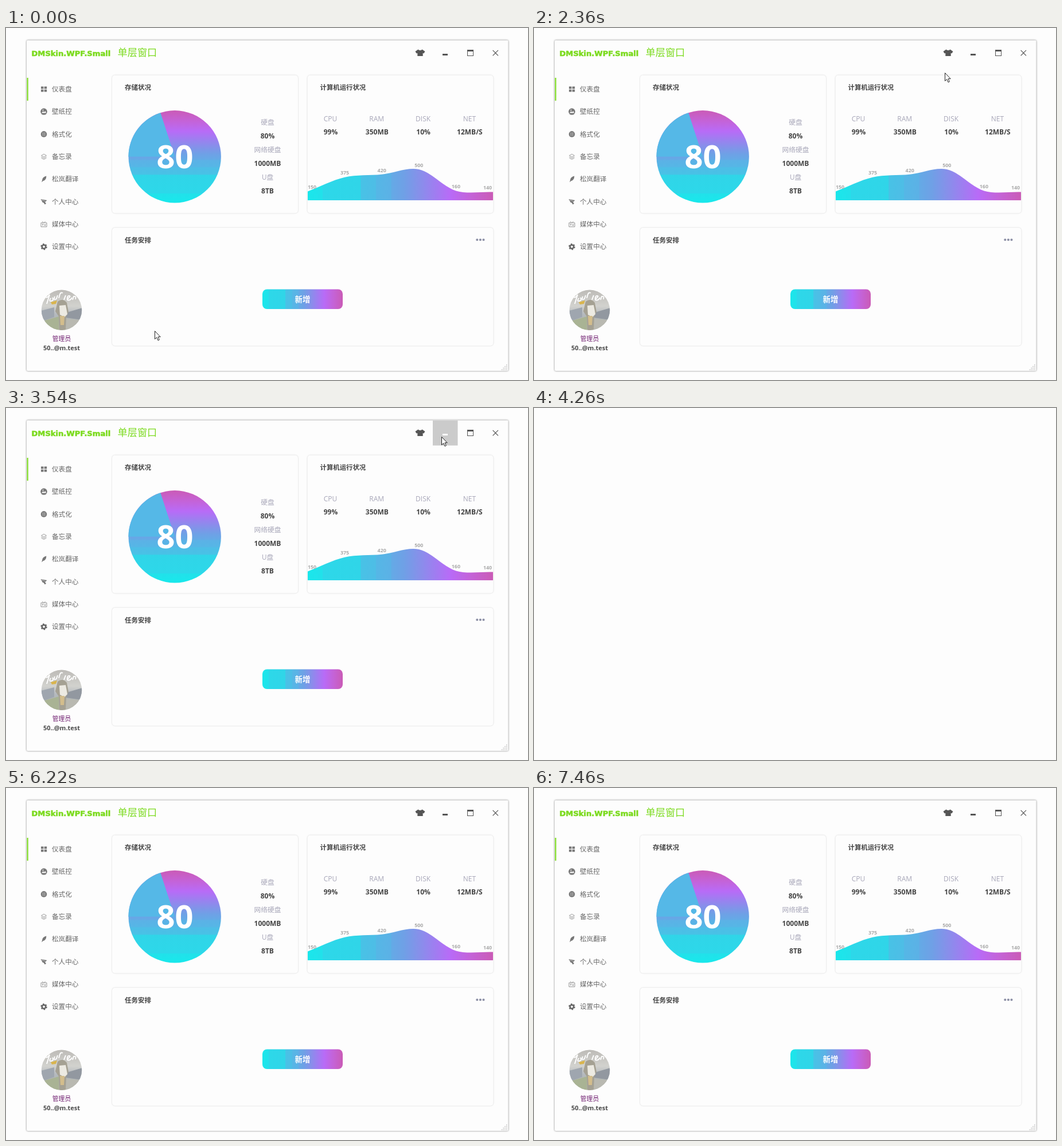
Write an HTML page that moves like this. It is 910x615 px and loops after 8 s.

```html
<!DOCTYPE html>
<html lang="zh-CN">
<head>
<meta charset="utf-8">
<title>Dashboard</title>
<style>
html, body { margin: 0; width: 100%; height: 100%; overflow: hidden; background: #fdfdfd; }
svg { display: block; width: 910px; height: 615px; }
text { font-family: "Open Sans", "Noto Sans CJK SC", "Noto Sans CJK", sans-serif; }
.b { font-weight: 700; }
.card { fill: #fdfdfd; filter: drop-shadow(0 0 1.3px rgba(0,0,0,.18)); }
</style>
</head>
<body>
<svg viewBox="0 0 910 615" xmlns="http://www.w3.org/2000/svg">
  <defs>
    <linearGradient id="across"></linearGradient>
    <linearGradient id="up" href="#across" x1="0" y1=".975" x2="0" y2="0"/>
    <linearGradient id="photo" x1="0" y1="0" x2="0" y2="1">
      <stop offset="0" stop-color="#bcbab6"/>
      <stop offset=".4" stop-color="#d2d2ce"/>
      <stop offset=".6" stop-color="#b4b9be"/>
      <stop offset="1" stop-color="#adb2a0"/>
    </linearGradient>
    <clipPath id="round"><circle cx="97" cy="492.7" r="35.2"/></clipPath>
  </defs>

  <g id="win">
    <rect x="36" y="21.5" width="839.5" height="577.5" rx="2" fill="#fdfdfd" style="filter:drop-shadow(0 0 1.8px #777)"/>
    <text x="44.5" y="48.6" font-size="13.1" fill="#7ddb21" stroke="#7ddb21" stroke-width=".6" class="b" style="font-family:'DejaVu Sans',sans-serif">DMSkin.WPF.Small</text>
    <text x="194.5" y="49" font-size="17.2" font-weight="300" fill="#7ddb21">单层窗口</text>
    <rect x="36.500" y="87" width="2.200" height="40" fill="#7ddb21"/>

    <g id="buttons"></g>
    <g id="menu" fill="#777"></g>

    <g clip-path="url(#round)">
      <rect x="61" y="457" width="72" height="72" fill="url(#photo)"/>
      <path d="M61 494L84 488V505L61 513Z" fill="#9fa6af"/>
      <path d="M106 497L133 489V510L104 506Z" fill="#9298a0"/>
      <path d="M61 513L92 504V529H61Z" fill="#a9b394"/>
      <path d="M102 508L133 511V529H102Z" fill="#b9b9b1"/>
      <path d="M90 478Q99 471 106 480L109 496L105 504L104 528H93L92 504L86 495Z" fill="#a5a193"/>
      <path d="M93 485L104 484L107 500L102 505L94 501Z" fill="#eceae2"/>
      <path d="M94 503H102L101 519H95Z" fill="#d3bd8c"/>
      <path d="M78 479L89 476L87 482L80 483Z" fill="#d9b54d"/>
      <path d="M67 467Q70 475 76 466L71 482M78 472q-4 6 1 5t2-6M85 469q-3 8 3 4l2-6M92 472l2-7q2-4 5-2M104 467l-3 8M108 473q6-5 2-5t-3 7q5 2 8-4M116 475l2-6q5-1 3 5" fill="none" stroke="#fff" stroke-width="1.9"/>
    </g>
    <text x="97" y="547" font-size="10.8" text-anchor="middle" fill="#701f70">管理员</text>
    <text x="97" y="563" font-size="11" text-anchor="middle" fill="#4a4a4a" class="b">50..@m.test</text>

    <rect class="card" x="185" y="82.5" width="324" height="241" rx="5"/>
    <rect class="card" x="525.5" y="82.5" width="324" height="241" rx="5"/>
    <rect class="card" x="185" y="349" width="664.5" height="206" rx="5"/>

    <circle cx="294.2" cy="224.8" r="80.7" fill="url(#up)"/>
    <path d="M294.2 224.8L269.3 148A80.7 80.7 0 0 0 213.5 224.8Z" fill="#55b8e7"/>
    <text x="294.5" y="245" font-size="56" text-anchor="middle" fill="#fff" class="b">80</text>

    <path id="area" fill="url(#across)"/>
    <g id="labels"></g>

    <g fill="#8d90a6"><circle cx="821.3" cy="370" r="2.1"/><circle cx="826.9" cy="370" r="2.1"/><circle cx="832.5" cy="370" r="2.1"/></g>
    <rect x="447" y="456.5" width="140" height="34.500" rx="8" fill="url(#across)"/>
    <text x="517" y="478.7" font-size="13.4" text-anchor="middle" fill="#fff" class="b">新增</text>
    <g id="grip" fill="#aaa"></g>

    <g id="tip" opacity="0">
      <path d="M34 425H161Q164 425 164 428V446.500Q164 449.500 161 449.500H102L97 454.500L92 449.500H34Q31 449.500 31 446.500V428Q31 425 34 425Z" fill="#7ddb21"/>
      <text x="97" y="441" font-size="11" text-anchor="middle" fill="#fff">503718264@m.test</text>
    </g>
  </g>
  <path id="cursor" d="M.5 .5V14.500L3.800 11.500L6 16.800L8.300 15.800L6.100 10.700H10.200Z" fill="#fff" stroke="#222" stroke-width="1"/>
</svg>

<script>
const NS = 'http://www.w3.org/2000/svg';
const $ = id => document.getElementById(id);

function add(parent, tag, attrs, content) {
  const el = document.createElementNS(NS, tag);
  for (const k in attrs) el.setAttribute(k, attrs[k]);
  if (content) el.textContent = content;
  parent.appendChild(el);
  return el;
}
function label(x, y, str, size, fill, bold, anchor = 'middle') {
  add($('labels'), 'text', { x, y, 'font-size': size, fill, 'text-anchor': anchor, class: bold ? 'b' : '' }, str);
}

// Shared colour ramp, cyan to magenta, with its hard bands
[[0, '#1ae7eb'], [.08, '#22e1ea'], [.082, '#2dd8e9'], [.285, '#30d5e8'], [.287, '#48c2e6'],
 [.368, '#4ebde6'], [.37, '#55b7e6'], [.45, '#5cb1e6'], [.452, '#64aae6'], [.52, '#6fa0e6'],
 [.6, '#8690ea'], [.77, '#b86bf7'], [.88, '#c463d8'], [1, '#ca5bb6']]
  .forEach(([o, c]) => add($('across'), 'stop', { offset: o, 'stop-color': c }));

// Sidebar; icons are drawn around their own centre
const items = [
  ['仪表盘', '<path d="M-5-4.500h4.500v4h-4.500zM.7-4.500h4.500v4h-4.500zM-5 .7h4.500v4h-4.500zM.7 .7h4.500v4h-4.500z"/>'],
  ['壁纸控', '<circle r="5.800"/><path d="M-4 2.500L-1.500-.5L.5 1L2.500-1L4 2.500Z" fill="#fdfdfd"/><circle cx="-1.500" cy="-2.500" r="1" fill="#fdfdfd"/>'],
  ['格式化', '<circle r="5.300"/><path d="M-3.500-1.500h7M-3.500 1.500h7M-1.500-3.500v7M1.500-3.500v7" stroke="#bbb" stroke-width=".7"/>'],
  ['备忘录', '<path d="M0-4.500L4.500-2L0 .5L-4.500-2ZM-4.500 .3L0 2.700L4.500 .3M-4.500 2.400L0 4.800L4.500 2.400" fill="none" stroke="#888" stroke-width=".8"/>'],
  ['松岚翻译', '<path d="M4.300-5.500Q4.500 2-1.500 3.200L-3.800 5.500L-3 2Q-3-3.500 4.300-5.500Z"/>'],
  ['个人中心', '<path d="M-5.500-4.500L5.500-2.500L2 .5L4 3.500L1.500 4.700L-.3 1.700L-2 1.500Z"/><path d="M-4-3L2-1" stroke="#ddd" stroke-width=".7"/>'],
  ['媒体中心', '<path d="M-5-2.500h10v7h-10zM-2.500-5L-1-2.800M2.500-5L1-2.800M-3.200 0h2.600M-1.900 0v2.700M.8 0L2 2.700L3.300 0" fill="none" stroke="#888" stroke-width=".9"/>'],
  ['设置中心', '<circle r="3.200" fill="none" stroke="#666" stroke-width="2.600"/><circle r="4.900" fill="none" stroke="#666" stroke-width="1.700" stroke-dasharray="2.600 2.530"/>']
];
items.forEach(([name, icon], i) => {
  const y = 106.7 + 39.35 * i;
  add($('menu'), 'g', { transform: `translate(66 ${y})` }).innerHTML = icon;
  add($('menu'), 'text', { x: 80, y: y + 4.300, 'font-size': 11.6, fill: '#666' }, name);
});

label(207, 108.3, '存储状况', 11.5, '#444', 1, 'start');
label(547.5, 108.3, '计算机运行状况', 11.4, '#444', 1, 'start');
label(207, 374.5, '任务安排', 11.5, '#444', 1, 'start');
['硬盘', '80%', '网络硬盘', '1000MB', 'U盘', '8TB'].forEach((s, i) =>
  label(456, 169.200 + 24 * i, s, i % 2 ? 12 : 11.7, i % 2 ? '#444' : '#a8a7b9', i % 2));
[['CPU', '99%'], ['RAM', '350MB'], ['DISK', '10%'], ['NET', '12MB/S']].forEach(([k, v], i) => {
  const x = 566 + 80.8 * i;
  label(x - .5, 163.300, k, 12, '#a8a7b9');
  label(x, 186.300, v, 12, '#444', 1);
});

// Smoothed area chart: tangents follow the midpoints of neighbouring segments
const loads = [150, 375, 420, 500, 160, 140];
const SMOOTH = .65;
const pts = loads.map((v, i) => [526 + 64.6 * i, 302 - .11 * v]);
const at = i => pts[Math.min(pts.length - 1, Math.max(0, i))];
const mid = (a, b) => [(a[0] + b[0]) / 2, (a[1] + b[1]) / 2];
const dist = (a, b) => Math.hypot(a[0] - b[0], a[1] - b[1]);

function handle(i, side) {
  const [a, p, b] = [at(i - 1), at(i), at(i + 1)];
  const c1 = mid(a, p), c2 = mid(p, b);
  const k = dist(a, p) / (dist(a, p) + dist(p, b));
  const share = (side > 0 ? 1 - k : -k) * SMOOTH;
  return p.map((v, n) => v + (c2[n] - c1[n]) * share);
}
let area = `M526 301L${pts[0]}`;
for (let i = 1; i < pts.length; i++) area += `C${handle(i - 1, 1)} ${handle(i, -1)} ${pts[i]}`;
$('area').setAttribute('d', area + 'V301Z');
loads.forEach((v, i) =>
  label(Math.min(839.5, Math.max(533.5, pts[i][0])), pts[i][1] - 4.300, v, 8.9, '#aaa', 1));

for (let r = 0; r < 4; r++)
  for (let c = 0; c <= r; c++)
    add($('grip'), 'rect', { x: 872 - 2.700 * c, y: 588 + 2.800 * r, width: 1.3, height: 1.3 });

// Title bar buttons, 44 px each
const shapes = [
  'M718.500 37.500Q722 40.500 725.500 37.500L730.500 41L728.300 44.500L726.700 43.800V49H717.300V43.800L715.700 44.500L713.500 41Z',
  'M761 45H770V48H761Z',
  'M804 38H815V49H804ZM805 41V48H814V41Z',
  'M848.200 39.300L849 38.500L853.300 42.800L857.600 38.500L858.400 39.300L854.100 43.600L858.400 47.900L857.600 48.700L853.300 44.400L849 48.700L848.200 47.900L852.500 43.600Z'
];
const buttons = shapes.map((d, i) => ({
  x: 700 + 44 * i,
  bg: add($('buttons'), 'rect', { x: 700 + 44 * i, y: 22, width: 43.5, height: 43.5, fill: '#cbcbcb' }),
  icon: add($('buttons'), 'path', { d, 'fill-rule': 'evenodd' })
}));

// Pointer stops: time, x, y
const path = [
  [0, 259, 529], [50, 260, 529], [560, 260, 529], [760, 205, 513], [910, 128, 489], [1060, 108, 484],
  [1160, 107, 484], [1510, 107, 484], [1660, 150, 455], [1910, 385, 310], [2160, 640, 135],
  [2310, 712, 82], [2360, 716, 78], [2510, 714, 60], [2660, 720, 38], [2860, 748, 4],
  [3010, 772, 14], [3160, 786, 32], [3260, 802, 40], [3360, 796, 45], [3460, 768, 49], [3510, 759, 50],
  [4010, 759, 50], [4110, 655, 215], [4210, 470, 524]
];
const hidden = [[3910, 5100], [5600, 6220], [6930, 7460]];
const LOOP = 8000;

function ramp(t, a, b) { return Math.min(1, Math.max(0, (t - a) / (b - a))); }

function pointer(t) {
  const q = Math.max(0, Math.floor((t - 10) / 50) * 50 + 10);
  const i = path.findIndex(p => p[0] > q);
  if (i < 0) return path[path.length - 1].slice(1);
  const a = path[i - 1], b = path[i], k = ramp(q, a[0], b[0]);
  return [1, 2].map(n => Math.round(a[n] + (b[n] - a[n]) * k));
}

function draw(t) {
  const [x, y] = pointer(t);
  $('cursor').setAttribute('transform', `translate(${x} ${y})`);
  $('cursor').setAttribute('visibility', t < 4260 ? 'visible' : 'hidden');
  $('win').setAttribute('display', hidden.some(([a, b]) => t >= a && t < b) ? 'none' : 'inline');
  $('tip').setAttribute('opacity', ramp(t, 950, 1190) * (1 - ramp(t, 1600, 1800)));
  for (const b of buttons) {
    const over = t < 4260 && x >= b.x && x < b.x + 44 && y >= 22 && y < 66;
    b.bg.setAttribute('opacity', over ? 1 : 0);
    b.icon.setAttribute('fill', over ? '#fff' : '#555');
  }
}

const start = performance.now();
function tick() {
  draw((performance.now() - start) % LOOP);
  requestAnimationFrame(tick);
}
tick();
</script>
</body>
</html>
```
